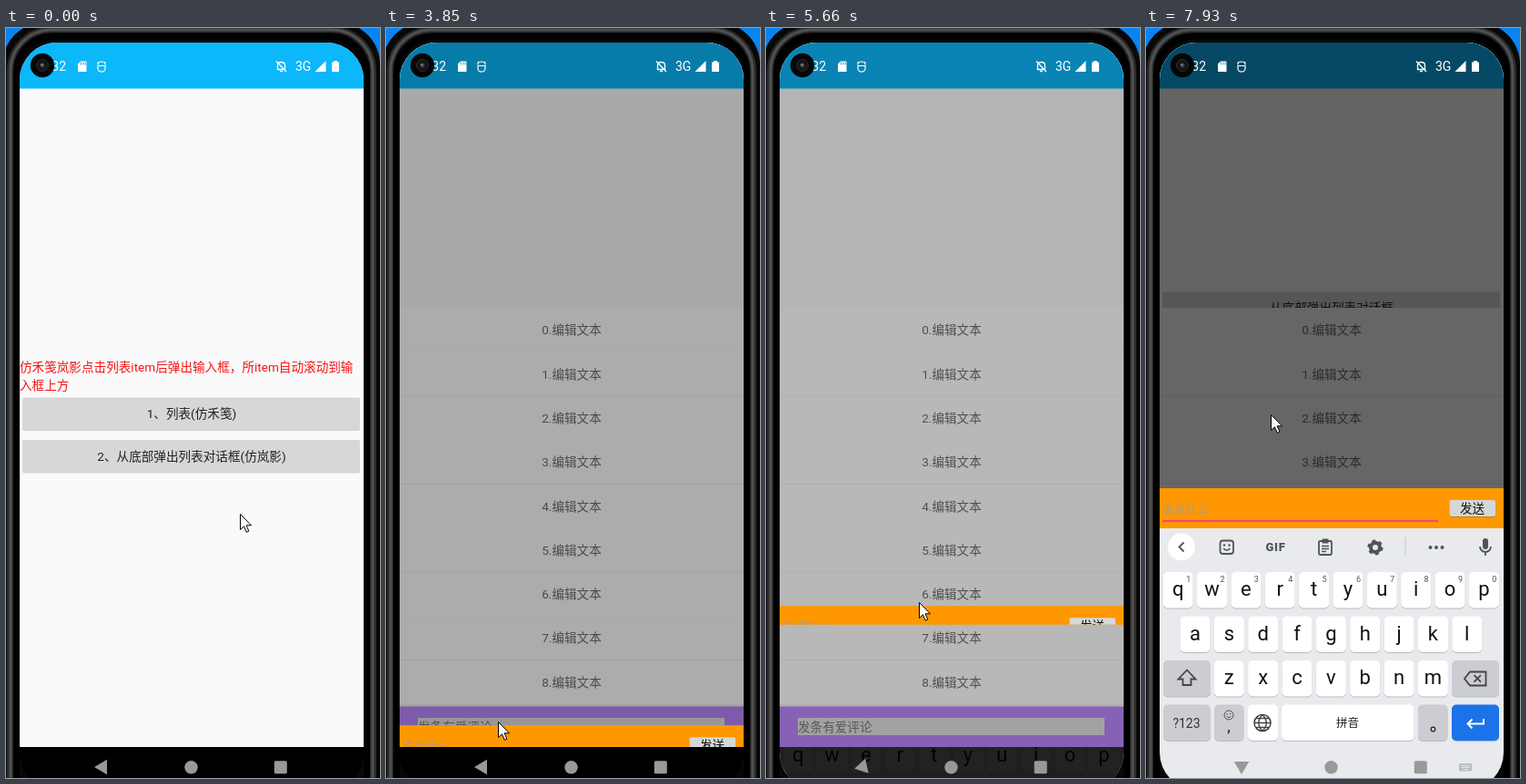
Animation, 411 px wide and 823 px high, one loop 8 s. Source, as an HTML page:

```html
<!DOCTYPE html>
<html lang="zh-CN">
<head>
<meta charset="utf-8">
<style>
html, body { margin: 0; height: 100%; overflow: hidden; background: #000; }
svg { display: block; width: 100vw; height: 100vh; }
text { font-family: Roboto, "Noto Sans CJK SC", "Noto Sans CJK", sans-serif; }
</style>
</head>
<body>
<script>
const LOOP = 8000, FS = 13.6;

// ---- drawing helpers ----
const text = (x, y, s, fill = '#222', size = FS, anchor = 'middle', more = '') =>
  `<text x="${x}" y="${y}" fill="${fill}" font-size="${size}" text-anchor="${anchor}" ${more}>${s}</text>`;
const rect = (x, y, w, h, fill, r = 0, more = '') =>
  `<rect x="${x}" y="${y}" width="${w}" height="${h}" fill="${fill}" rx="${r}" ${more}/>`;
const circle = (x, y, r, fill, more = '') => `<circle cx="${x}" cy="${y}" r="${r}" fill="${fill}" ${more}/>`;
const path = (d, fill = 'none', more = '') => `<path d="${d}" fill="${fill}" ${more}/>`;
const line = (d, color = '#50545a', w = 1.8) => path(d, 'none', `stroke="${color}" stroke-width="${w}"`);
const group = (id, body, more = '') => `<g id="${id}" ${more}>${body}</g>`;

const button = (y, label, rippleId) =>
  rect(18, y + 1.5, 371, 35, '#000', 2, 'opacity=".16"') +
  rect(18, y, 371, 35.5, '#d6d7d7', 2) +
  (rippleId ? rect(18, y, 371, 35.5, 'url(#ripple)', 2, `id="${rippleId}" opacity="0"`) : '') +
  text(204, y + 22.7, label);

// ---- screens ----
const page = body => rect(15, 16, 378, 773, '#fafafa') + rect(15, 16, 378, 50.5, '#0cb7fa') + body;

const menuPage = page(
  text(15, 377, '仿禾笺岚影点击列表item后弹出输入框，所item自动滚动到输', '#f81414', FS, 'start') +
  text(15, 396.5, '入框上方', '#f81414', FS, 'start') +
  button(405.5, '1、列表(仿禾笺)') +
  button(452, '2、从底部弹出列表对话框(仿岚影)', 'ripple1'));

const dialogPage = page(group('opener', button(409.5, '从底部弹出列表对话框', 'ripple2')));

let list = rect(15, 307, 378, 482, '#fff');
for (let i = 0; i < 9; i++) {
  const y = 331.5 + i * 48.3;
  list += text(204, y + 4.8, i + '.编辑文本', '#6e6e6e') + rect(15, y + 23.5, 378, 1, '#000', 0, 'opacity=".05"');
}
list += rect(15, 742, 378, 3, '#f2f2f2') + rect(15, 744.5, 378, 44.5, '#bb86fc') +
  rect(35, 757, 337, 19, '#e0e0e0') + text(35, 771.5, '发条有爱评论', '#777', FS, 'start');

const inputBar = rect(15, 0, 378, 44, '#ff9800') +
  text(18, 26.5, '说点什么', '#a39c92', 12.8, 'start', 'opacity=".85"') +
  rect(18, 35, 303, 2, '#ff4081') +
  rect(333.5, 14, 50.5, 18, '#000', 2, 'opacity=".2"') + rect(333.5, 13, 50.5, 18, '#d6d7d7', 2) +
  text(358.5, 27, '发送', '#111');

// ---- keyboard ----
const key = (x, y, w, fill = '#fff', h = 39.5) =>
  rect(x, y + 1, w, h, '#000', 5, 'opacity=".2"') + rect(x, y, w, h, fill, 5);
const letters = (s, x0, y, digits) => [...s].map((c, i) => {
  const x = x0 + i * 37.35;
  return key(x - 16.5, y, 33) + text(x, y + 26, c, '#111', 22) +
    (digits ? text(x + 11.5, y + 10.5, (i + 1) % 10, '#555', 9) : '');
}).join('');
const gray = '#cccdd3', ink = '#50545a';

const toolbar = circle(39, 569.5, 15, '#fff') + line('M41.5 564.5l-5 5 5 5') +
  rect(81.5, 562.5, 14.5, 14.5, 'none', 3, `stroke="${ink}" stroke-width="1.8"`) +
  circle(86, 567.5, 1.2, ink) + circle(91.5, 567.5, 1.2, ink) + line('M85 571q4 4 7.5 0', ink, 1.5) +
  text(142.5, 574, 'GIF', ink, 13, 'middle', 'font-weight="900" letter-spacing=".7"') +
  rect(190, 563, 14, 15, 'none', 1.5, `stroke="${ink}" stroke-width="1.8"`) + rect(193.5, 560.5, 7, 5, ink, 1) +
  line('M193 568.5h8M193 571.5h8M193 574.5h5', ink, 1.3) +
  circle(252, 570, 5, 'none', `stroke="${ink}" stroke-width="4"`) +
  circle(252, 570, 7.3, 'none', `stroke="${ink}" stroke-width="2.6" stroke-dasharray="3.8 3.84"`) +
  rect(284.5, 559, 1, 21, '#c4c7cc') +
  [312.5, 319, 325.5].map(x => circle(x, 570, 2, ink)).join('') +
  rect(370, 560, 6, 12, ink, 3) + line('M367 569a6 6 0 0 0 12 0M373 575v4');

const keyboard = rect(15, 549, 378, 290, '#e8eaed') + toolbar +
  letters('qwertyuiop', 35.2, 597, true) + letters('asdfghjkl', 54, 645.5) + letters('zxcvbnm', 91.3, 694) +
  key(19, 694, 52, gray) + line('M45 704.5l-9.5 10h5v6.5h9v-6.5h5z', '#444') +
  key(336, 694, 52, gray) + line('M350 714l6-7.5h17.5v15h-17.5zM360.5 710.2l7.5 7.5M368 710.2l-7.5 7.5', '#444') +
  key(19, 742.5, 52, gray) + text(44.5, 768, '?123', '#333', 14) +
  key(75, 742.5, 32.5, gray) + circle(91, 754, 5, 'none', 'stroke="#555"') +
  circle(89.2, 752.7, .8, '#555') + circle(92.8, 752.7, .8, '#555') + line('M88.5 755.5q2.5 2.5 5 0', '#555', 1) +
  text(91, 772, ',', '#222', 18) +
  key(112, 742.5, 33) + circle(128, 762.5, 9, 'none', 'stroke="#444" stroke-width="1.5"') +
  line('M119 762.5h18M121 757.5h14M121 767.5h14M128 753.5q-8.5 9 0 18q8.5-9 0-18', '#444', 1.3) +
  key(149, 742.5, 145.5) + text(221.5, 767, '拼音', '#222', 12.5) +
  key(299, 742.5, 32.5, gray) + circle(315.5, 769.5, 2.3, 'none', 'stroke="#222" stroke-width="1.2"') +
  key(336, 742.5, 52, '#1a73e8') + line('M371 758v5.5h-17M358.5 758.5l-5 5 5 5', '#fff', 2) +
  rect(344, 807, 14, 8.5, '#b9bcbf', 1) + line('M346 809.5h10M346 811.5h10M348 813.7h6', '#e8eaed', .9);

// ---- fixed parts ----
const status =
  text(66, 47.2, '3:32', '#fff', 14, 'end') +
  path('M82 36.5h6.5v11.5h-9.5v-8.5z', '#fff') + line('M82.5 37.5v3M85 37.5v3M87.2 37.5v3', '#18a0d8', .9) +
  line('M101 41.5v3a4 3.5 0 0 0 8 0v-3zM101 40.5v-1.5q0-2 4-2t4 2v1.5M101 37l1 1.5M109 37l-1 1.5', '#fff', 1.2) +
  line('M298.5 45.5h8v-4.5q0-3.5-4-3.5t-4 3.5zM301 47.5h3M297 36.5l11 11.5', '#fff', 1.3) +
  text(318, 47.2, '3G', '#fff', 14, 'start') +
  path('M351.5 36v12h-12z', '#fff') + path('M358 37.5h2v-1.5h4v1.5h2v10.5h-8z', '#fff');
const camera = circle(40, 41, 13.2, '#050505') + circle(40, 41, 6.5, '#151515', 'stroke="#2a2a2a" stroke-width="1"') +
  circle(40, 41, 2.4, '#444') + circle(39.3, 40.3, 1, '#999');
const navIcons = path('M97 811l14-8.2v16.4z', '#999', 'id="back"') + circle(203.5, 811.3, 7.2, '#999') +
  rect(294.8, 804.3, 14, 14, '#999', 1.5);
const ring = (x, y, r, color, w) =>
  rect(x, y, 408 - 2 * x, 900, 'none', r, `stroke="${color}" stroke-width="${w}"`);

document.body.innerHTML = `<svg viewBox="0 0 411 823" preserveAspectRatio="none">
<defs>
  <linearGradient id="ripple"><stop stop-opacity=".07"/><stop offset=".2" stop-opacity=".11"/>
    <stop offset=".8" stop-opacity=".12"/><stop offset="1" stop-opacity=".08"/></linearGradient>
  <clipPath id="screen">${rect(15, 16, 378, 820, '#000', 41)}</clipPath>
  <clipPath id="content">${rect(15, 16, 378, 773, '#000')}</clipPath>
  <clipPath id="barClip">${rect(15, 0, 378, 789, '#000', 0, 'id="barBox"')}</clipPath>
  <clipPath id="keysClip">${rect(15, 0, 378, 840, '#000', 0, 'id="keysBox"')}</clipPath>
</defs>
${rect(0, 0, 411, 823, '#0a84f0') + rect(-4, -6, 415, 910, '#080808', 46)}
${ring(4.5, 2, 45, '#2a2a2a', 7) + ring(5, 2, 45, '#505050', 3) + ring(11.5, 9, 42, '#000', 7)}
<g clip-path="url(#screen)">
  ${rect(15, 16, 378, 820, '#000') + menuPage + group('page2', dialogPage)}
  <g clip-path="url(#content)">${group('list', list)}</g>
  ${rect(15, 16, 378, 773, '#000', 0, 'id="dim"')}
  <g clip-path="url(#barClip)">${group('bar', inputBar)}</g>
  <g clip-path="url(#keysClip)">${group('keys', keyboard)}</g>
  ${rect(15, 789, 378, 50, '#000', 0, 'id="nav"') + navIcons + status}
</g>
${camera}
${path('M.5 .5V17.5L4.5 13.8 7.2 20.2 9.8 19.1 7.1 12.8H12.5Z', '#fff', 'id="cursor" stroke="#000"')}
</svg>`;

// ---- motion ----
const $ = id => document.getElementById(id);
const set = (id, name, value) => $(id).setAttribute(name, value);
const move = (id, x, y) => set(id, 'transform', `translate(${x} ${y})`);
const ramp = (t, a, b) => Math.min(1, Math.max(0, (t - a) / (b - a)));
const easeOut = x => 1 - (1 - x) ** 2;
const smooth = x => x * x * (3 - 2 * x);

// rows of [time, value...]
function along(rows, t, ease = x => x) {
  let i = 0;
  while (i < rows.length - 2 && t >= rows[i + 1][0]) i++;
  const [a, ...from] = rows[i], [b, ...to] = rows[i + 1], f = ease(ramp(t, a, b));
  return from.map((v, j) => v + (to[j] - v) * f);
}

const CLOSE = 5530, CLOSED = 5775;
const pointer = [[70, 257, 533], [650, 228, 464], [880, 228, 464], [1020, 240, 512], [1160, 240, 512],
  [1950, 292, 420], [2350, 292, 420], [2770, 277, 513], [2830, 277, 513], [3440, 92, 781], [3640, 96, 778],
  [3850, 123, 761], [4130, 123, 761], [4910, 194, 650], [5400, 168, 440], [5500, 168, 440], [5660, 168, 630],
  [6400, 205, 766], [6630, 213, 790], [7510, 196, 643], [7580, 196, 643], [7930, 137, 424], [8000, 137, 424]];
const barShow = [[3690, 0], [3850, .54], [3980, .85], [4130, .85], [4200, 1], [CLOSE, 1], [CLOSED, 0],
  [6510, 0], [6630, .4], [6810, 1], [8000, 1]];
const press1 = [[690, 0], [760, 1], [890, 1], [1020, 0]];
const press2 = [[2080, 0], [2160, 1], [2280, 1], [2480, 0]];

function draw(t) {
  const closing = t >= CLOSE && t < CLOSED, q = ramp(t, CLOSE, CLOSED);
  const show = along(barShow, t)[0];
  const keys = closing ? 1 - q ** .73
    : easeOut(t < CLOSE ? ramp(t, 4200, 4500) : ramp(t, 6880, 7180));
  const enter = easeOut(ramp(t, 1250, 1560)), scale = .85 + .15 * enter;
  const barEnd = closing ? 549 + 240 * q ** 1.31 : Math.min(789, 836 - 287 * keys);

  set('ripple1', 'opacity', along(press1, t)[0]);
  set('ripple2', 'opacity', along(press2, t)[0]);
  set('page2', 'opacity', enter);
  set('page2', 'transform', `translate(204 411) scale(${scale}) translate(-204 -411)`);
  move('opener', 0, keys > .3 && !closing ? -120 : 0);
  move('list', 0, 482 * (1 - easeOut(ramp(t, 2350, 2720))));
  set('dim', 'opacity', .6 * show);
  set('barBox', 'height', barEnd);
  move('bar', 0, barEnd - 44 * show);
  set('keysBox', 'y', closing ? 789 : 0);
  move('keys', 0, 287 * (1 - keys));
  set('nav', 'opacity', closing ? Math.min(1, 1.62 * q) : 1 - keys);
  set('back', 'transform', `rotate(${-90 * keys ** 2} 105 811)`);
  move('cursor', ...along(pointer, t, smooth));
  set('cursor', 'opacity', t > 6600 && t < 6690 ? .15 : 1);
}

const start = performance.now();
function tick() {
  draw((performance.now() - start) % LOOP);
  requestAnimationFrame(tick);
}
tick();
</script>
</body>
</html>
```
